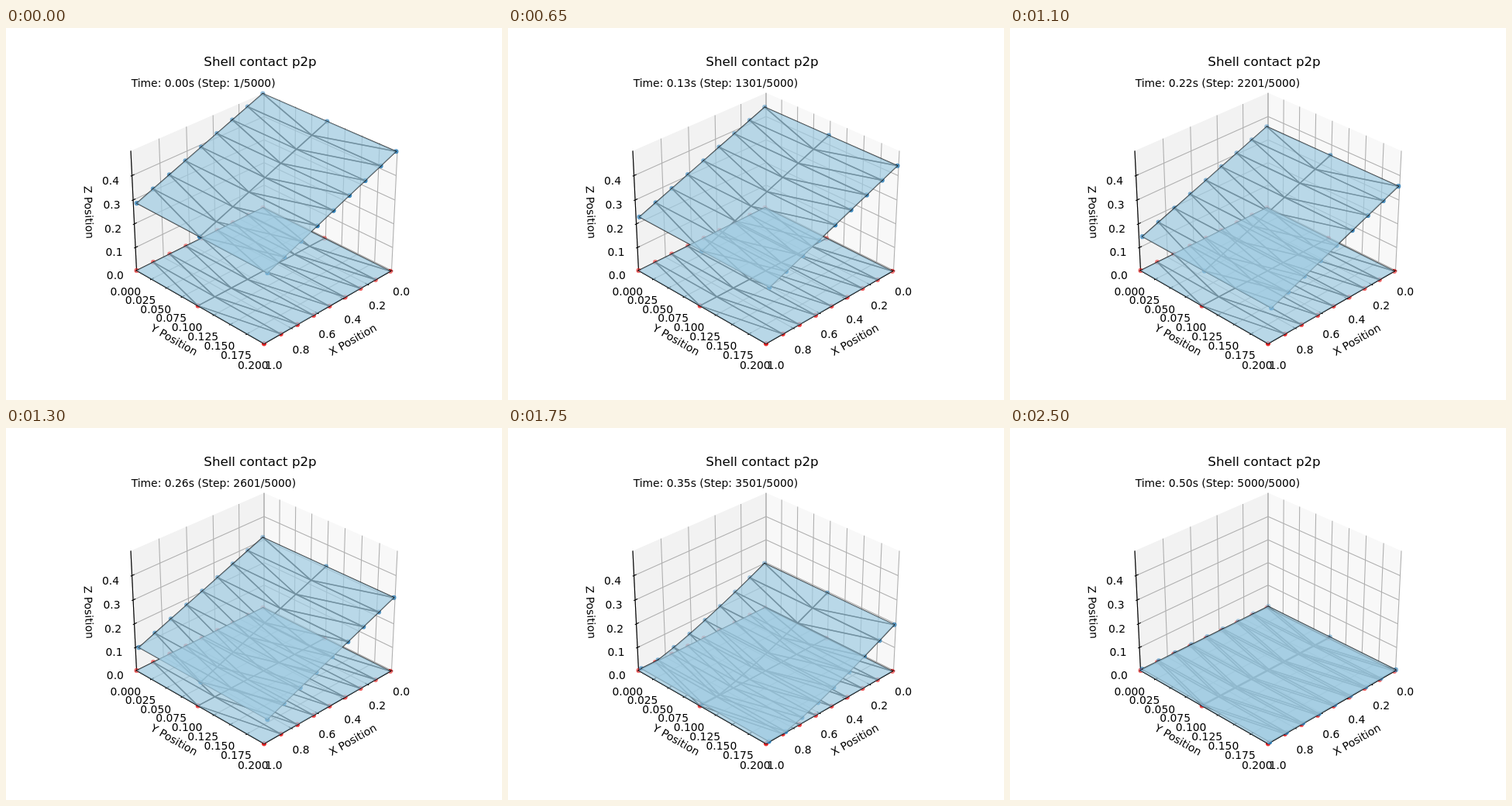
An HTML page with a canvas that plays this animation: 640 by 480 pixels, repeating every 2.55 s.

```html
<!DOCTYPE html>
<html>
<head>
<meta charset="utf-8">
<style>
html, body { margin: 0; overflow: hidden; background: #fff; }
canvas { display: block; }
</style>
</head>
<body>
<canvas id="stage" width="640" height="480"></canvas>
<script>
const ctx = document.getElementById('stage').getContext('2d');
const LOOP = 2550, FRAME = 50, STEPS = 5000;
const ROWS = [0, 1, 2, 3, 4, 5, 6, 7, 8];
const WIDTH = 0.2, HEIGHT = 0.5, SEGMENT = 0.12375;
const FONT = '"DejaVu Sans", sans-serif';

// Perspective camera: elevation 30, azimuth 45, distance 10.
function project(x, y, z) {
  const px = 1.19048 * (x - 0.5);
  const py = 1.19048 * (y / WIDTH - 0.5);
  const pz = 0.89286 * (z / HEIGHT - 0.5);
  const right = Math.SQRT1_2 * (py - px);
  const up = -0.353553 * (px + py) + 0.866025 * pz;
  const depth = 10 - 0.612372 * (px + py) - 0.5 * pz;
  return [333 + 1997.8 * right / depth, 237.4 - 1997.8 * up / depth, depth];
}

function trace(points) {
  ctx.beginPath();
  for (const [x, y] of points) ctx.lineTo(x, y);
}

function polyline(points, color, width) {
  trace(points);
  ctx.strokeStyle = color;
  ctx.lineWidth = width;
  ctx.stroke();
}

function polygon(points, color) {
  trace(points);
  ctx.fillStyle = color;
  ctx.fill();
}

function label(text, x, y, { size = 13.89, align = 'center', angle = 0 } = {}) {
  ctx.save();
  ctx.translate(x, y);
  ctx.rotate(angle * Math.PI / 180);
  ctx.font = `${size}px ${FONT}`;
  ctx.textAlign = align;
  ctx.fillStyle = '#000';
  ctx.fillText(text, 0, 0);
  ctx.restore();
}

// Each axis: tick values, point on the axis, label offset, grid lines.
const axes = [
  { ticks: [0, 0.2, 0.4, 0.6, 0.8, 1], digits: 1, end: 1, offset: [12.6, 27.4],
    at: (v, out = 0) => project(v, WIDTH * (1 + out), 0),
    grid: v => [[v, WIDTH, 0], [v, 0, 0], [v, 0, HEIGHT]] },
  { ticks: ROWS.map(i => i * 0.025), digits: 3, end: WIDTH, offset: [-14.2, 27.4],
    at: (v, out = 0) => project(1 + out, v, 0),
    grid: v => [[1, v, 0], [0, v, 0], [0, v, HEIGHT]] },
  { ticks: [0, 0.1, 0.2, 0.3, 0.4], digits: 1, end: HEIGHT, offset: [-27.6, 6.2],
    at: (v, out = 0) => project(1 + out, 0, v),
    grid: v => [[1, 0, v], [0, 0, v], [0, WIDTH, v]] },
];

function drawAxes() {
  const pane = (color, ...corners) => polygon(corners.map(c => project(...c)), color);
  pane('#f8f8f8', [0, 0, 0], [0, WIDTH, 0], [0, WIDTH, HEIGHT], [0, 0, HEIGHT]);
  pane('#f2f2f2', [0, 0, 0], [1, 0, 0], [1, 0, HEIGHT], [0, 0, HEIGHT]);
  pane('#f5f5f5', [0, 0, 0], [1, 0, 0], [1, WIDTH, 0], [0, WIDTH, 0]);
  for (const { ticks, grid } of axes)
    for (const v of ticks) polyline(grid(v).map(p => project(...p)), '#b0b0b0', 1.11);
  for (const { ticks, digits, end, offset, at } of axes) {
    polyline([at(0), at(end)], '#000', 1.11);
    for (const v of ticks) {
      polyline([at(v, -0.017), at(v, 0.01)], '#000', 1.11);
      const [x, y] = at(v);
      label(v.toFixed(digits), x + offset[0], y + offset[1] + 5);
    }
  }
  label('X Position', 449.8, 406.5, { angle: -29.7 });
  label('Y Position', 214.5, 406.5, { angle: 29.7 });
  label('Z Position', 102, 238, { angle: 87.4 });
  label('Shell contact p2p', 328, 49.2, { size: 16.67 });
}

// Distance fallen by the upper edge, as a smooth curve through a few points.
const times = [0, 0.08, 0.18, 0.26, 0.35, 0.43, 0.5];
const drops = [0, 0.0243, 0.0995, 0.187, 0.3, 0.389, 0.497];

function slope(i) {
  if (i === 0) return 0;
  const j = Math.min(i + 1, times.length - 1);
  return (drops[j] - drops[i - 1]) / (times[j] - times[i - 1]);
}

function fallen(t) {
  let i = 0;
  while (i < times.length - 2 && t > times[i + 1]) i++;
  const span = times[i + 1] - times[i], u = (t - times[i]) / span, w = 1 - u;
  return drops[i] * w * w * (1 + 2 * u) + drops[i + 1] * u * u * (3 - 2 * u)
    + span * (slope(i) * u * w * w - slope(i + 1) * u * u * w);
}

// The tilted sheet falls rigidly, then bends flat as it meets the ground.
function fallingProfile(t) {
  const top = HEIGHT - fallen(t);
  const reach = top / 0.0275;
  const bend = 1 + 14.7 * Math.max(0, t - 0.335);
  const heights = ROWS.map(i => Math.max(0.003, top * Math.max(0, 1 - i / reach) ** bend));
  const xs = [0];
  for (let i = 1; i < 9; i++)
    xs.push(xs[i - 1] + Math.sqrt(SEGMENT ** 2 - (heights[i] - heights[i - 1]) ** 2));
  const shift = 0.4932 - xs.reduce((a, b) => a + b) / 9;
  return ROWS.map(i => [xs[i] + shift, heights[i]]);
}

const flatProfile = ROWS.map(i => [0.01 + i * SEGMENT, 0]);

function makeShell(profile) {
  return [0, 0.1, 0.2].map(y => profile.map(([x, z]) => project(x, y, z)));
}

function drawMesh([left, middle, right], color) {
  for (const [x, y, depth] of [...left, ...right, middle[0], middle[8]]) {
    ctx.globalAlpha = Math.min(1, Math.max(0.3, 1 - 0.7 * (depth - 9.3) / 1.6));
    ctx.beginPath();
    ctx.arc(x, y, 3.1, 0, 7);
    ctx.fillStyle = color;
    ctx.fill();
  }
  ctx.globalAlpha = 1;
  ctx.lineJoin = 'round';
  // Every triangle is outlined, so shared sides come out darker.
  for (const i of ROWS.slice(1)) {
    for (const side of [left, right]) {
      for (const [a, b] of [[side[i], side[i - 1]], [middle[i - 1], side[i - 1]]])
        polyline([middle[i], a, b, middle[i]], 'rgba(0, 0, 0, 0.75)', 1.5);
    }
  }
}

function fillShell([left, , right]) {
  polygon([...left, ...[...right].reverse()], 'rgba(158, 202, 225, 0.7)');
}

function draw(ms) {
  const step = Math.min(Math.floor(ms % LOOP / FRAME) * 100 + 1, STEPS);
  const t = step / 10000;
  ctx.fillStyle = '#fff';
  ctx.fillRect(0, 0, 640, 480);
  drawAxes();
  const ground = makeShell(flatProfile), sheet = makeShell(fallingProfile(t));
  drawMesh(ground, '#e8191a');
  drawMesh(sheet, '#1f77b4');
  fillShell(ground);
  fillShell(sheet);
  label(`Time: ${t.toFixed(2)}s (Step: ${step}/${STEPS})`, 161.7, 76.1, { align: 'left' });
}

const start = performance.now();
function tick() {
  draw(performance.now() - start);
  requestAnimationFrame(tick);
}
tick();
</script>
</body>
</html>
```
